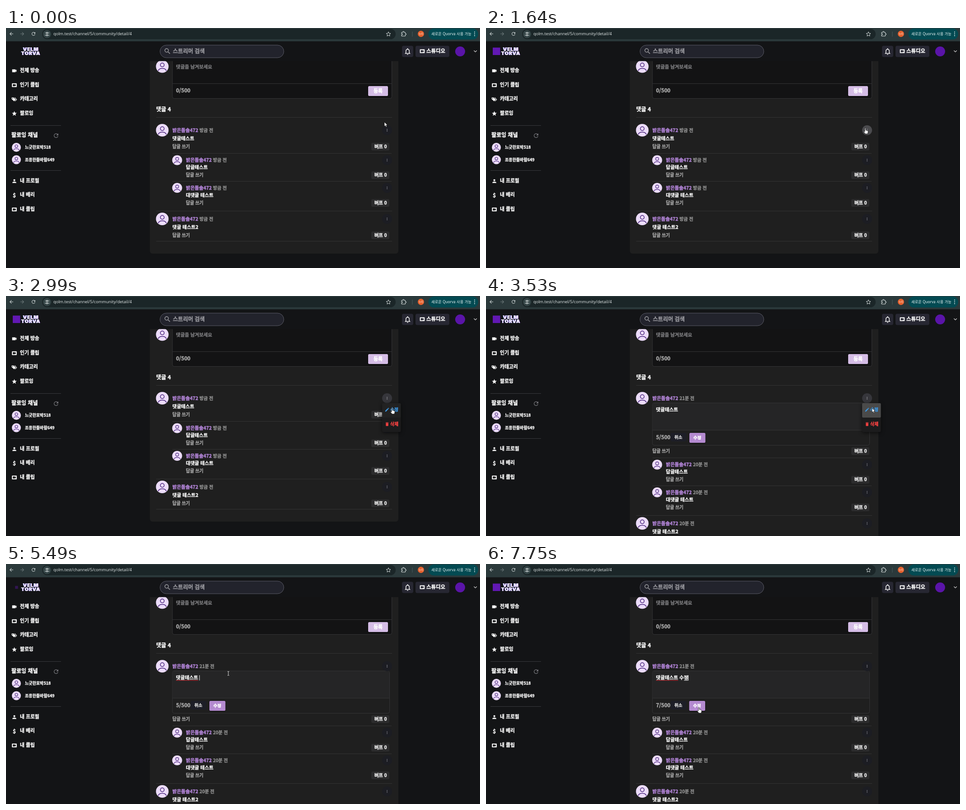
These frames come from a looping animation (1051x533 px, 8 s). An HTML page:

```html
<!DOCTYPE html>
<html lang="ko">
<head>
<meta charset="utf-8">
<title>Comments</title>
<style>
html, body { margin: 0; width: 100%; height: 100%; overflow: hidden; background: #131416; }
svg { display: block; width: 100vw; height: 100vh; }
text { font-family: "Noto Sans CJK KR", "Noto Sans CJK", sans-serif; font-weight: 900; white-space: pre; stroke-width: .4px; }
.url { font-family: "Open Sans", "Noto Sans", sans-serif; font-weight: 400; stroke-width: 0; }
.thin { font-weight: 400; stroke-width: 0; }
.brand { font-family: Inter, sans-serif; font-weight: 900; text-anchor: middle; letter-spacing: .8px; }
.mid { text-anchor: middle; }
.raised { filter: drop-shadow(0 1px 1px #0008); }
</style>
</head>
<body>
<svg id="stage" viewBox="0 0 1051 533" preserveAspectRatio="none"></svg>
<script>
const LOOP = 8000, SHIFT = 81;
const USER = '밝은돌솔472';
const svg = document.getElementById('stage');

const ICONS = {
  cam: 'M17 10.5V7c0-.6-.4-1-1-1H4c-.6 0-1 .4-1 1v10c0 .6.4 1 1 1h12c.6 0 1-.4 1-1v-3.5l4 4v-11z',
  clip: 'M20 4H4a2 2 0 0 0-2 2v12c0 1.1.9 2 2 2h16a2 2 0 0 0 2-2V6a2 2 0 0 0-2-2zM6 8h8v2.7l4-2.7v8l-4-2.7V16H6z',
  tags: 'M1 4h8l9 9-7 7-10-9zM5 6.5a1.5 1.5 0 1 0 .1 0zM12 4h3l8 9-7 7-2-1 6-6z',
  star: 'M12 17.3 18.2 21l-1.7-7L22 9.2l-7.2-.6L12 2 9.2 8.6 2 9.2l5.5 4.8L5.8 21z',
  person: 'M12 12a4 4 0 1 0 0-8 4 4 0 0 0 0 8zm0 2c-2.7 0-8 1.3-8 4v2h16v-2c0-2.7-5.3-4-8-4z',
  bell: 'M12 22a2 2 0 0 0 2-2h-4a2 2 0 0 0 2 2zm6-6v-5c0-3.1-1.6-5.6-4.5-6.3V4a1.5 1.5 0 0 0-3 0v.7C7.6 5.4 6 7.9 6 11v5l-2 2v1h16v-1zm-2 1H8v-6c0-2.5 1.5-4.5 4-4.5s4 2 4 4.5z',
  search: 'M15.5 14h-.8l-.3-.3A6.5 6.5 0 1 0 13.7 14.4l.3.3v.8l5 5 1.5-1.5zm-6 0a4.5 4.5 0 1 1 0-9 4.5 4.5 0 0 1 0 9z',
  reload: 'M17.65 6.35A8 8 0 1 0 19.73 14h-2.08A6 6 0 1 1 16.22 7.78L13 11h7V4z',
  pencil: 'M3 17.25V21h3.75L17.8 9.9l-3.7-3.7zM20.7 7a1 1 0 0 0 0-1.4l-2.3-2.3a1 1 0 0 0-1.4 0l-1.9 1.8 3.8 3.8z',
  trash: 'M6 19a2 2 0 0 0 2 2h8a2 2 0 0 0 2-2V7H6zM19 4h-3.5l-1-1h-5l-1 1H5v2h14z',
  back: 'M20 11H7.8l5.6-5.6L12 4l-8 8 8 8 1.4-1.4L7.8 13H20z',
  puzzle: 'M20.5 11H19V7a2 2 0 0 0-2-2h-4V3.5a2.5 2.5 0 0 0-5 0V5H4a2 2 0 0 0-2 2v3.8h1.5a2.7 2.7 0 0 1 0 5.4H2V20a2 2 0 0 0 2 2h13a2 2 0 0 0 2-2v-4h1.5a2.5 2.5 0 0 0 0-5z'
};

// Text is placed by its vertical centre.
const text = (x, y, s, size, fill = '#f4f4f4', attr = '') =>
  `<text x="${x}" y="${y + size * .37}" font-size="${size}" fill="${fill}" stroke="${fill}" ${attr}>${s}</text>`;
const rect = (x, y, w, h, fill, r = 0, attr = '') =>
  `<rect x="${x}" y="${y}" width="${w}" height="${h}" rx="${r}" fill="${fill}" ${attr}/>`;
const disc = (x, y, r, fill, attr = '') => `<circle cx="${x}" cy="${y}" r="${r}" fill="${fill}" ${attr}/>`;
const rule = (x1, x2, y, color = '#333') => `<path d="M${x1} ${y}H${x2}" stroke="${color}"/>`;
const icon = (name, x, y, size, fill = '#f4f4f4', attr = '') =>
  `<path d="${ICONS[name]}" fill="${fill}" fill-rule="evenodd" ${attr} transform="translate(${x} ${y}) scale(${size / 24}) translate(-12 -12)"/>`;
const dots = (x, y, gap, r, fill) => [-gap, 0, gap].map(d => disc(x, y + d, r, fill)).join('');

const avatar = (x, y, r) => `<g transform="translate(${x} ${y}) scale(${r / 14})">${disc(0, 0, 14, '#ecdcfa')}
  <g fill="none" stroke="#48227a" stroke-width="1.5"><circle cy="-3.5" r="4.2"/><path d="M-9 9.5C-7 2.5 7 2.5 9 9.5"/></g></g>`;

const footer = (x, y) => text(x, y, '답글 쓰기', 9.8, '#a3a3a3') +
  rect(810, y - 8, 40, 17, '#2c2c2d', 3) + text(817, y, '버프 0', 10.2);
const head = (x, y, when) => text(x, y, USER, 10.5, '#b183d6') + text(x + 60, y, when, 10, '#8d8d8d');
const more = y => disc(845, y, 11, '#1c1d23') + dots(845, y, 2.2, .7, '#a9a9b4');

function reply(y, when, body) {
  return avatar(379.5, y, 11) + head(399, y, when) + text(399, y + 16, body, 10.5) +
    footer(399, y + 33) + more(y);
}

// Everything below the first comment's body.
function thread(when) {
  return footer(369, 263) + rule(369, 855, 278.5) +
    reply(293.5, when, '답글테스트') + rule(369, 855, 340.5) +
    reply(355, when, '대댓글 테스트') + rule(333, 856, 406.5) +
    avatar(346.5, 424, 14) + head(369, 424, when) + text(369, 442, '댓글 테스트2', 10.5) +
    footer(369, 460) + more(424) + rule(333, 856, 473.5);
}

function browserBar() {
  return rect(0, 0, 1051, 29.5, '#2b393b') + rect(80, 2, 784, 23, '#1b2628', 11.5) +
    icon('back', 12, 13, 12, '#d5dcdc') + `<g transform="scale(-1 1)">${icon('back', -36, 13, 12, '#707c7e')}</g>` +
    icon('reload', 61, 13, 12, '#d5dcdc') + disc(91, 13.5, 9, '#344446') +
    `<g fill="none" stroke="#dfe6e6" stroke-width="1.1"><path d="M87 11h3M93 16h3M92 11h4M86 16h3"/><circle cx="91" cy="11" r="1.4"/><circle cx="91" cy="16" r="1.4"/></g>` +
    text(105, 13, 'qolm.test/channel/5/community/detail/4', 9.2, '#e4eaea', 'class="url"') +
    icon('star', 848, 13.5, 12, 'none', 'stroke="#d5dcdc" stroke-width="2"') +
    icon('puzzle', 882, 13, 12, 'none', 'stroke="#d5dcdc" stroke-width="2.2"') +
    rect(900.5, 8, 1, 11, '#4a5a5c') + disc(920, 13, 7, '#e5602c') +
    text(920, 13, '누리', 5.5, '#fff', 'class="thin mid"') +
    rect(936.5, 1, 110.5, 24.5, '#034a52', 12.2) +
    text(943, 13, '새로운 Quorva 사용 가능', 8.3, '#e8f4f4', 'class="thin"') + dots(1039, 13, 4, 1.1, '#e8f4f4');
}

function pageHeader() {
  return rect(0, 29, 1051, 44.5, '#131416') +
    rect(341.5, 38, 274.5, 28, '#22232c', 14, 'stroke="#5a5b66"') +
    icon('search', 358, 51.5, 17, '#a5a5a8') + text(370, 51, '스트리머 검색', 12.2, '#94949a') +
    rect(878, 39.5, 25, 25, '#272732', 4) + icon('bell', 890.5, 52, 18) +
    rect(908, 39.5, 75, 25, '#272732', 4) + icon('clip', 923, 51.5, 13) + text(932, 51, '스튜디오', 11.4) +
    disc(1007, 52, 11, '#5a14a8') +
    `<path d="M1037.5 50l3.2 3.2 3.2-3.2" fill="none" stroke="#ccc" stroke-width="1.3"/>`;
}

function sidebar() {
  const items = [['cam', 94, '전체 방송'], ['clip', 126, '인기 클립'], ['tags', 157.5, '카테고리'], ['star', 189, '팔로잉'],
    ['person', 339, '내 프로필'], ['', 370.5, '내 베리'], ['clip', 402, '내 클립']];
  const friends = [[265, '느긋한호박518'], [292.5, '조용한들바람649']];
  return items.map(([name, y, s]) =>
      (name ? icon(name, 18.5, y + 1, 13) : text(18.5, y + 1, '$', 12, '#f4f4f4', 'class="mid"')) + text(31, y, s, 10.8)).join('') +
    rule(10, 122, 216.5, '#393a3d') + rule(10, 122, 316.5, '#393a3d') +
    text(12, 238, '팔로잉 채널', 12) + icon('reload', 111, 239, 15, '#77777c') +
    friends.map(([y, s]) => avatar(23, y, 10) + text(42, y, s, 9)).join('');
}

function commentForm() {
  return avatar(346.5, 85.5, 14) + rect(369, 60, 486.5, 96.5, '#131314', 4, 'stroke="#343436"') +
    rule(369, 855, 123.5, '#343436') +
    text(377, 86.5, '댓글을 남겨보세요', 10.5, '#77777a') + text(377, 139, '0/500', 11.6, '#a8a8a8') +
    rect(803, 129, 44, 22, '#d5bde6', 2.5, 'class="raised"') + text(825, 139.5, '등록', 10.9, '#fff', 'class="mid"') +
    text(333, 181, '댓글 4', 12) + rule(333, 856, 198.5);
}

const editor = rect(369, 237.5, 481.5, 94, '#1f1f1f', 4, 'stroke="#343436"') +
  rect(369.5, 238, 480.5, 60, '#252526', 3) + rule(369, 850, 298, '#343436') +
  text(377, 252.5, '', 10.6, '#f4f4f4', 'id="input"') +
  '<path id="typo" d="M377 258.5H426" stroke="#d8323a"/><path id="compose" stroke="#eee"/><path id="caret" stroke="#fff"/>' +
  text(377, 314, '', 11.6, '#a8a8a8', 'id="count"') +
  rect(409.5, 304, 34.5, 19, '#1d1e27', 3) + text(426.5, 313, '취소', 9.6, '#d6d6d6', 'class="mid"') +
  `<g id="save">${rect(451, 304, 35.5, 22, '#b48ad0', 2.5, 'class="raised"')}${text(468.5, 314, '수정', 9.5, '#fff', 'class="mid"')}</g>`;

const menu = rect(834, 238, 41.5, 64, '#1c1c1d', 3, 'style="filter:drop-shadow(0 2px 4px #0009)"') +
  rect(834, 238, 41.5, 32, '#4a4a4a', 2, 'id="menuRow"') +
  icon('pencil', 845, 252.5, 11, '#3b97e3') + text(852, 252, '수정', 9.8, '#3b97e3') +
  icon('trash', 845, 284.5, 11, '#f04040') + text(852, 284, '삭제', 9.8, '#f04040');

const brandLines = (dx, fill) => [['VELM', -.8], ['TORVA', 8]].map(([s, y]) =>
  `<text class="brand" x="${dx + .4}" y="${y}" font-size="10.8" fill="${fill}">${s}</text>`).join('');

svg.innerHTML = rect(0, 0, 1051, 533, '#131416') +
  rect(319, 60, 551, 441, '#1f1f1f', 6, 'id="panel"') + commentForm() + avatar(346.5, 227, 14) +
  `<g id="viewing">${head(369, 227, '방금 전')}${text(369, 245.5, '댓글테스트', 10.5)}${thread('방금 전')}</g>
   <g id="editing">${head(369, 227, '21분 전')}${editor}<g transform="translate(0 ${SHIFT})">${thread('20분 전')}</g></g>` +
  disc(845, 227, 11, '#1c1d23', 'id="more"') + dots(845, 227, 2.2, .7, '#c4c4cc') +
  `<g id="menu">${menu}</g>` + sidebar() + pageHeader() + browserBar() +
  rect(15, 43.5, 16.5, 16.5, '#6218b4', 0, 'id="mark"') +
  `<g id="brand">${brandLines(-.7, '#6f7be8')}${brandLines(.7, '#a86be0')}${brandLines(0, '#f6f4ff')}</g>
   <g id="pointer"><circle id="click" r="8.5" cx="-1.3" cy="-.5" fill="#a8a10f"/>
   <path id="arrow" d="M0 0V9.5L2.2 7.4 3.8 11 5.4 10.3 3.9 6.8H7Z" fill="#fff" stroke="#111" stroke-width=".7"/>
   <path id="hand" d="M-1 1a1 1 0 0 1 2 0V5l3.8.9q1.6.4 1.4 2L5.7 11 5 13H0L-3.3 8.7q-.3-1.4 1-1.2L-1 8.5Z" fill="#fff" stroke="#111" stroke-width=".7"/>
   <path id="beam" d="M-2-4.5Q0-4.5 0-3.5 0-4.5 2-4.5M0-3.5V3.5M-2 4.5Q0 4.5 0 3.5 0 4.5 2 4.5" fill="none" stroke="#ddd"/></g>`;

const el = {};
svg.querySelectorAll('[id]').forEach(n => el[n.id] = n);

const PATH = [[0, 839, 209], [70, 839, 209], [870, 838, 216], [1150, 841, 222], [2250, 841, 222], [2990, 856, 249],
  [3740, 856, 249], [4440, 493, 243], [6940, 493, 243], [7220, 475, 300], [7480, 467, 330], [7740, 472, 318]];
const TYPING = [[0, '', 5], [5490, ' ', 5], [5620, ' ㅅ', 6], [5820, ' 수', 6], [5950, ' 숮', 6], [6100, ' 수저', 7], [6410, ' 수정', 7]];
const CLICKS = [[1710, 1900], [3330, 3480], [4630, 4900]];

const clamp = v => Math.min(1, Math.max(0, v));
const smooth = v => (v = clamp(v)) * v * (3 - 2 * v);
const between = (t, a, b) => t >= a && t < b;
const show = (node, on) => node.setAttribute('visibility', on ? 'inherit' : 'hidden');

function pointerAt(t) {
  const i = PATH.findIndex(p => p[0] > t);
  if (i < 0) return PATH.at(-1).slice(1);
  const [t0, x0, y0] = PATH[i - 1], [t1, x1, y1] = PATH[i];
  const k = smooth((t - t0) / (t1 - t0));
  return [x0 + (x1 - x0) * k, y0 + (y1 - y0) * k];
}

function pointerKind(t, x, y) {
  if (t < 3470) return t < 940 ? 'arrow' : 'hand';
  if (x < 850 && y > 237 && y < 298) return 'beam';
  return x > 451 && x < 487 && y > 304 && y < 326 ? 'hand' : 'arrow';
}

function drawBrand(t) {
  const u = t < 4630 ? t + 450 : t - 4630;
  const grow = smooth((u + 150) / 500), pop = smooth((u - 520) / 800);
  el.brand.setAttribute('transform', `translate(${50 + 4.5 * grow} 52) scale(${.5 + .5 * grow})`);
  el.mark.setAttribute('transform', `translate(23.5 52) scale(${pop}) translate(-23.5 -52)`);
  el.mark.setAttribute('opacity', pop);
}

function drawInput(t) {
  const [start, typed, n] = TYPING.findLast(s => s[0] <= t);
  el.input.textContent = '댓글테스트' + typed;
  el.count.textContent = n + '/500';
  el.save.setAttribute('transform', `translate(${n > 5 ? -.5 : 0} 0)`);
  const end = 377 + el.input.getComputedTextLength();
  const since = t - Math.max(start, 4630);
  el.caret.setAttribute('d', `M${end + .3} 247V258.5`);
  el.compose.setAttribute('d', `M${end - 9.2} 258.5H${end}`);
  show(el.caret, since >= 0 && Math.floor(since / 530) % 2 === 0);
  show(el.compose, typed.length > 1);
  show(el.typo, t >= 4630);
}

function draw(t) {
  const editing = t >= 3470;
  show(el.viewing, !editing);
  show(el.editing, editing);
  el.panel.setAttribute('height', editing ? 500 : 441);
  drawBrand(t);
  if (editing) drawInput(t);
  else [el.caret, el.compose, el.typo].forEach(n => show(n, false));

  el.more.setAttribute('fill', between(t, 1290, 1850) ? '#4b4b4e' : between(t, 940, 3740) ? '#36363b' : '#1c1d23');
  el.menu.setAttribute('opacity', clamp((t - 1850) / 200) * (1 - clamp((t - 3540) / 120)));
  el.menuRow.setAttribute('opacity', editing ? 1 : t > 2600 ? .12 : 0);

  const [x, y] = pointerAt(t), kind = pointerKind(t, x, y);
  el.pointer.setAttribute('transform', `translate(${x} ${y})`);
  for (const k of ['arrow', 'hand', 'beam']) show(el[k], k === kind);
  show(el.click, CLICKS.some(([a, b]) => between(t, a, b)));
}

function tick() {
  draw(performance.now() % LOOP);
  requestAnimationFrame(tick);
}
tick();
</script>
</body>
</html>
```
